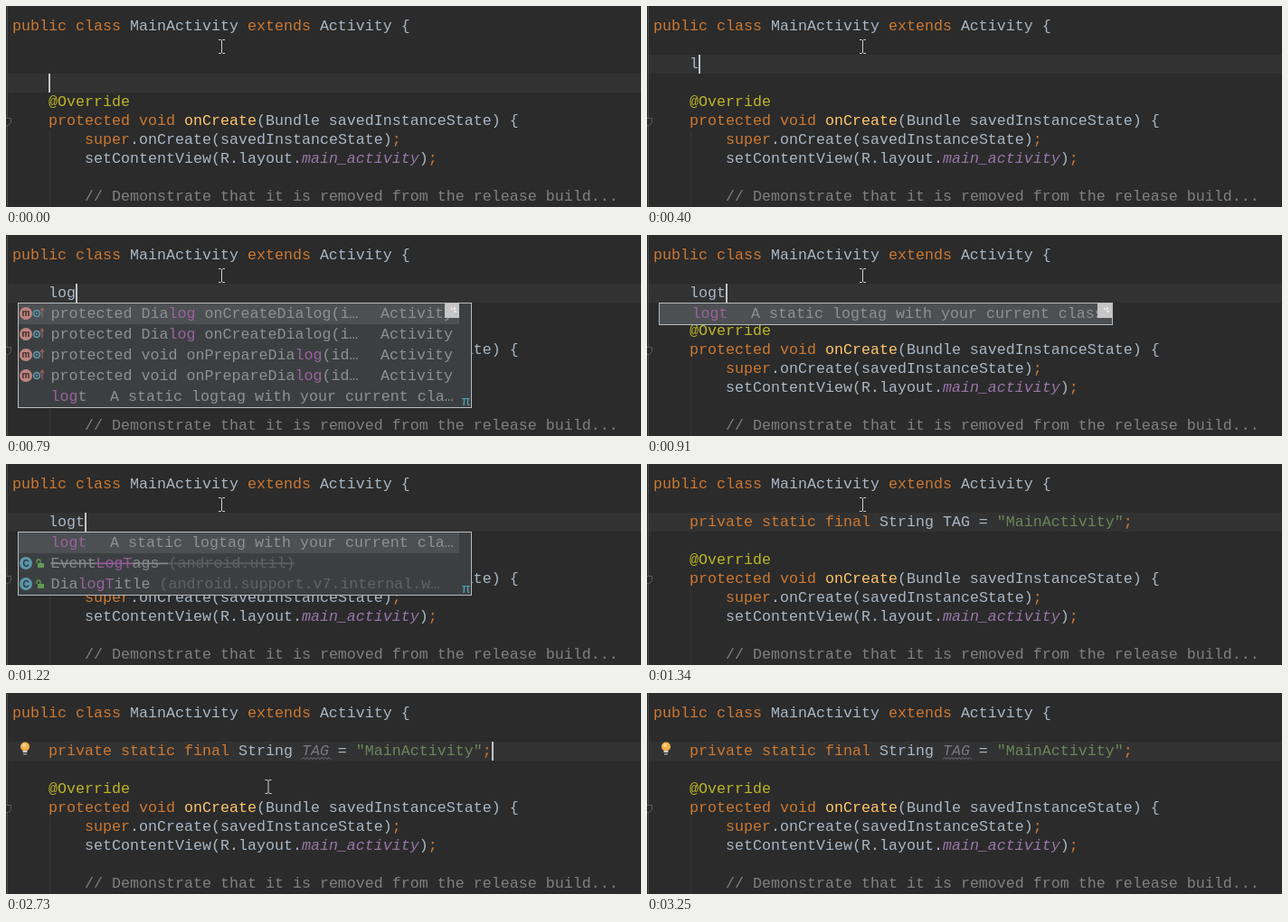
An HTML page for the animation above (3550 ms loop, 702 by 223 pixels).

```html
<!DOCTYPE html>
<html lang="en">
<head>
<meta charset="utf-8">
<title>Live template</title>
<style>
html, body { margin: 0; width: 100%; height: 100%; overflow: hidden; background: #2b2b2b; }
svg { display: block; width: 702px; height: 223px; }
text { font: 16.667px "Liberation Mono", monospace; white-space: pre; }
.t { fill: #a9b7c6; }
.k { fill: #cc7832; }
.m { fill: #ffc66d; }
.a { fill: #bbb529; }
.c { fill: #808080; }
.s { fill: #6a8759; }
.f { fill: #9876aa; font-style: italic; }
.u { fill: #777980; font-style: italic; }
.i { fill: #8e9193; }
.g { fill: #616466; }
.p { fill: #9a629f; }
.I { fill: #979a9c; font-weight: bold; }
.P { fill: #a567aa; font-weight: bold; }
.x { fill: #85888a; text-decoration: line-through; }
.y { fill: #945d98; text-decoration: line-through; }
.z { fill: #5e6163; text-decoration: line-through; }
.pi { font-size: 15px; fill: #4fa5bd; }
.badge { font: bold 10px "Liberation Sans", sans-serif; text-anchor: middle; }
.tiny { font: bold 6px "Liberation Sans", sans-serif; text-anchor: middle; fill: #8fbdd6; }
</style>
</head>
<body>
<svg id="stage" viewBox="0 0 702 223"></svg>
<script>
const LOOP = 3550, LEFT = 7, COL = 10, LINE = 21, ROW = 23;

const rect = (x, y, w, h, fill, extra = '') =>
  `<rect x="${x}" y="${y}" width="${w}" height="${h}" fill="${fill}" ${extra}/>`;

const path = (d, stroke, width = 1, fill = 'none') =>
  `<path d="${d}" stroke="${stroke}" stroke-width="${width}" fill="${fill}"/>`;

// Rich text: "~" starts a run, the next letter is its style class.
const rich = (x, y, runs) => `<text x="${x}" y="${y}">` + runs.split('~').slice(1)
  .map(r => `<tspan class="${r[0]}">${r.slice(1).replace(/</g, '&lt;')}</tspan>`).join('') + '</text>';

const code = (line, indent, runs) => rich(LEFT + indent * COL, 27 + line * LINE, runs);
const during = (from, to, body) => `<g data-from="${from}" data-to="${to}">${body}</g>`;
const lineTop = line => 12 + line * LINE;
const highlight = line => rect(2, lineTop(line), 700, LINE, '#323232');
const caret = (line, col) => rect(LEFT + col * COL, lineTop(line), 2, LINE, '#c4c4c4');

const beam = (x, y) => path(
  `M${x - 3.5} ${y - 7.5}h2.5l1 1l1 -1h2.5M${x} ${y - 7}v14M${x - 3.5} ${y + 7.5}h2.5l1 -1l1 1h2.5`, '#d0d0d0');

const bulb = `<circle cx="21" cy="59.5" r="5" fill="#f2b04a"/>` +
  `<circle cx="20" cy="58" r="2" fill="#f9d48c"/>` +
  rect(18.5, 64, 5, 2, '#c9c9c9') + rect(19, 67, 4, 1.5, '#a0a0a0');

// Row icons, drawn around the row's vertical middle.
const icons = {
  file: (y, mark = '01') =>
    path(`M16.8 ${y - 6.2}h7l4 4v8.6h-11zM23.5 ${y - 6}v4h4`, '#8b9ca6', 1.6) +
    rect(19, y - 1, 9, 6, '#3a5f76') + `<text class="tiny" x="23.5" y="${y + 4}">${mark}</text>`,
  brace: y => icons.file(y, '{}'),
  method: y => `<circle cx="22" cy="${y}" r="7" fill="#bd857f"/>` +
    `<text class="badge" x="22" y="${y + 3}" fill="#3b2a2a">m</text>` +
    `<circle cx="34" cy="${y}" r="3.4" fill="#3c3f41" stroke="#5f93a6" stroke-width="1.8"/>` +
    `<circle cx="34" cy="${y}" r="1.2" fill="#5f93a6"/>` +
    path(`M40 ${y + 4}v-10M38 ${y - 3}l2 -3l2 3`, '#a0635f', 1.2),
  type: y => `<circle cx="22" cy="${y}" r="7" fill="#5d97a8"/>` +
    `<text class="badge" x="22" y="${y + 3.5}" fill="#23363d">C</text>` +
    rect(35, y, 7, 5, '#5f9a55') + path(`M34 ${y}v-2a2 2 0 0 1 4 0v2`, '#5f9a55', 1.3)
};

const ROW_X = 49.5, HINT_X = 115, GUTTER = 13;

// Each row: [runs, icon, hint, right label]. Lists keep a scrollbar gutter.
function popup(rows, { right = 515, bottom = 76 + rows.length * ROW } = {}) {
  const gutter = rows.length > 1 ? GUTTER : 0;
  const frame = rect(13.5, 75.5, right - 14, bottom - 75, '#3c3f41', 'stroke="#b9bbbc"') +
    rect(14, 76, right - 15 - gutter, ROW, '#4c5052');
  return frame + rows.map(([runs, icon, hint, label], i) => {
    const mid = 87 + i * ROW, base = mid + 5;
    return (icon ? icons[icon](mid) : '') + rich(ROW_X, base, runs) +
      (hint ? rich(HINT_X, base, '~i' + hint) : '') +
      (label ? rich(414, base, '~i' + label) : '');
  }).join('');
}

const busy = (x, turn = 0) => rect(x, 76, 16, 16, '#c6c6c6') +
  `<g transform="rotate(${turn} ${x + 10} 84)">` +
  path(`M${x + 7} 81l2 2M${x + 11} 80v3M${x + 13} 85h-3`, '#f2f2f2', 1.5) + '</g>';
const piMark = y => `<text class="pi" x="504" y="${y}">π</text>`;

const broad = popup([
  ['~Pl~Iong'],
  ['~pL~iinkageError ~g(java.lang)', 'file'],
  ['~pL~iong ~g(java.lang)', 'file'],
  ['~iThread~pL~iocal~g<T> (java.lang)', 'file'],
  ['~iUnsatisfied~pL~iinkError ~g(java.lang)', 'file'],
  ['~ipub~pl~iic OnSharedPreferenceChangeListener ge…', 'brace'],
  ['~ipub~pl~iic']
], { bottom: 240 }) + rect(502, 76, 12, 150, '#3f4244') + rect(504, 78, 9, 23, '#6c6f71');

const create = ['~iprotected Dia~plog~i onCreateDialog(i…', 'method', '', 'Activity'];
const prepare = ['~iprotected void onPrepareDia~plog~i(id…', 'method', '', 'Activity'];
const cut = 'A static logtag with your current cla…';
const whole = 'A static logtag with your current class';

const methods = popup([create, create, prepare, prepare, ['~plog~it', '', cut]]) + busy(485) + piMark(189);
const template = right => popup([['~plogt', '', whole]], { right });
const classes = popup([
  ['~plogt', '', cut],
  ['~xEvent~yLogT~xags ~z(android.util)', 'type'],
  ['~iDia~plogT~iitle ~g(android.support.v7.internal.w…', 'type']
]) + piMark(143);

const typed = [[400, 'l'], [650, 'lo'], [790, 'log'], [910, 'logt'], [1340, '']];
const typing = typed.slice(0, -1).map(([from, word], i) =>
  during(from, typed[i + 1][0], code(2, 4, '~t' + word) + caret(2, 4 + word.length))).join('');

const wave = 'M327 73.5' + 'l2 -2l2 2'.repeat(8);

document.getElementById('stage').innerHTML = [
  rect(0, 0, 702, 223, '#2b2b2b'),
  during(0, 130, highlight(3)),
  during(130, LOOP, highlight(2)),
  rect(1, 0, 1, 223, '#4b4b4b'),
  path('M-4 124.5h9.5v5l-3 3h-7', '#5c5c5c', 1, '#2b2b2b'),
  rect(48, 138, 1, 85, '#353535'),
  code(0, 0, '~kpublic class ~tMainActivity ~kextends ~tActivity {'),
  code(4, 4, '~a@Override'),
  code(5, 4, '~kprotected void ~monCreate~t(Bundle savedInstanceState) {'),
  code(6, 8, '~ksuper~t.onCreate(savedInstanceState)~k;'),
  code(7, 8, '~tsetContentView(R.layout.~fmain_activity~t)~k;'),
  code(9, 8, '~c// Demonstrate that it is removed from the release build...'),

  during(0, 130, caret(3, 4)),
  during(130, 400, caret(2, 4)),
  typing,
  during(520, 790, broad),
  during(790, 910, methods),
  during(910, 1080, template(515) + busy(498)),
  during(1080, 1220, template(520) + busy(498, 45)),
  during(1220, 1340, classes),

  during(1340, LOOP, code(2, 4, '~kprivate static final ~tString     = ~s"MainActivity"~k;')),
  during(1340, 1740, code(2, 32, '~tTAG')),
  during(1740, 1900, code(2, 32, '~fTAG')),
  during(1900, LOOP, code(2, 32, '~uTAG') + path(wave, '#777980')),
  during(1900, 3250, caret(2, 53)),
  during(2730, LOOP, bulb),

  during(0, 2730, beam(238.5, 45)),
  during(2730, 2850, beam(290, 104)),
  during(2850, 2970, beam(339, 161))
].join('');

const timed = [...document.querySelectorAll('[data-from]')].map(el =>
  ({ el, from: +el.dataset.from, to: +el.dataset.to }));

const start = performance.now();
function draw() {
  const t = (performance.now() - start) % LOOP;
  for (const { el, from, to } of timed) el.style.display = t >= from && t < to ? '' : 'none';
  requestAnimationFrame(draw);
}
draw();
</script>
</body>
</html>
```
